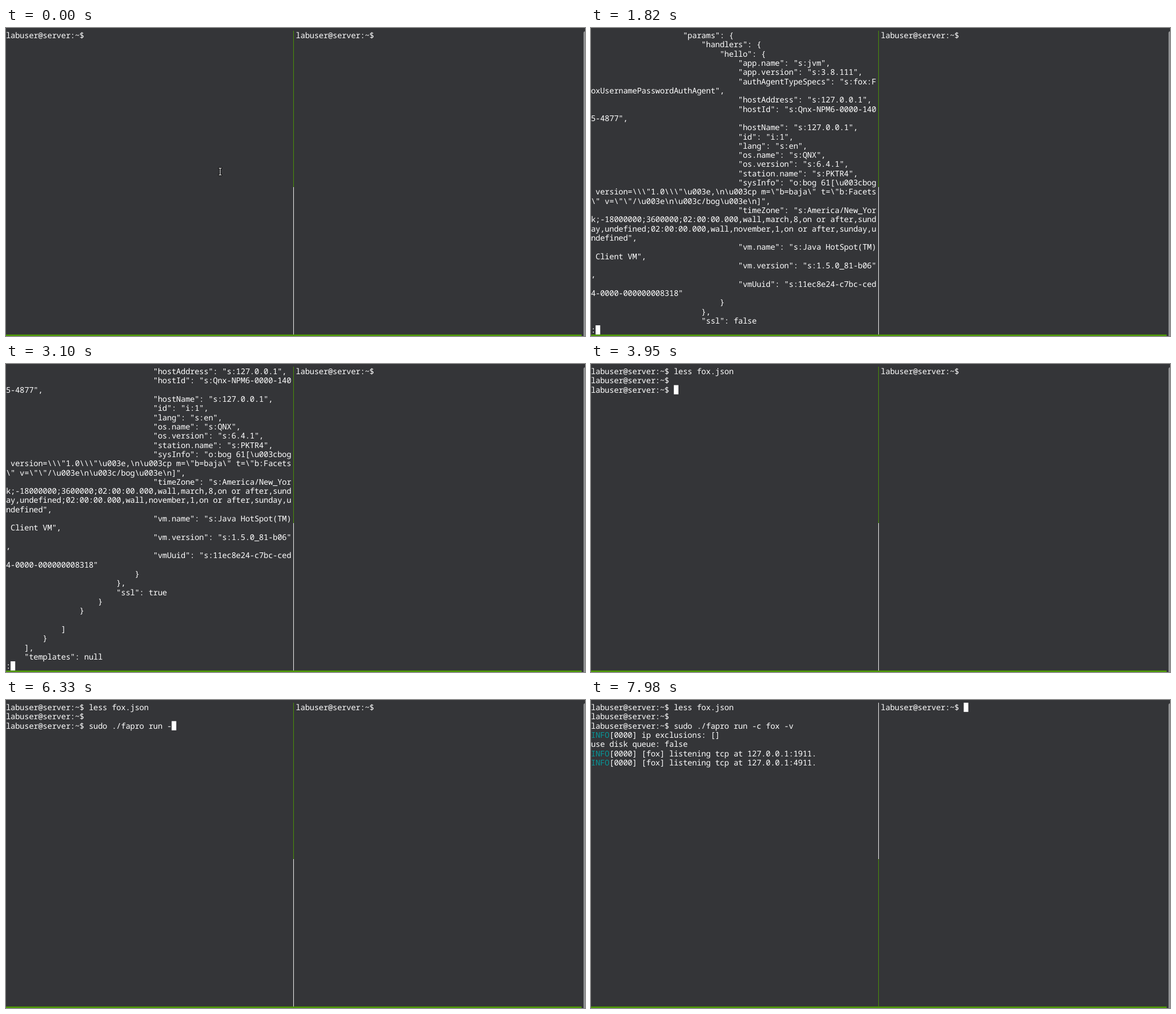
An HTML page with a canvas that plays this animation: 1026 by 546 pixels, repeating every 8 s.

```html
<!DOCTYPE html>
<html lang="en">
<head>
<meta charset="utf-8">
<title>Terminal session</title>
<style>
  html, body { margin: 0; width: 100%; height: 100%; overflow: hidden; background: #343538; }
  canvas { display: block; }
</style>
</head>
<body>
<canvas id="stage" width="1026" height="546"></canvas>
<script>
const ctx = document.getElementById('stage').getContext('2d');
const LOOP = 8000, COLS = 62, ROWS = 33;
const CELL_W = 8.154, CELL_H = 16.32, TOP = 4.8;
const BG = '#343538', FG = '#ffffff', GREEN = '#4e9a06', CYAN = '#06989a';
const PROMPT = 'labuser@server:~$ ';
const LESS = 'less fox.json', RUN = 'sudo ./fapro run -c fox -v ';

const handler = (port, ssl, end) => String.raw`                {
                    "handler": "fox",
                    "port": ${port},
                    "params": {
                        "handlers": {
                            "hello": {
                                "app.name": "s:jvm",
                                "app.version": "s:3.8.111",
                                "authAgentTypeSpecs": "s:fox:FoxUsernamePasswordAuthAgent",
                                "hostAddress": "s:127.0.0.1",
                                "hostId": "s:Qnx-NPM6-0000-1405-4877",
                                "hostName": "s:127.0.0.1",
                                "id": "i:1",
                                "lang": "s:en",
                                "os.name": "s:QNX",
                                "os.version": "s:6.4.1",
                                "station.name": "s:PKTR4",
                                "sysInfo": "o:bog 61[\u003cbog version=\\\"1.0\\\"\u003e,\n\u003cp m=\"b=baja\" t=\"b:Facets\" v=\"\"/\u003e\n\u003c/bog\u003e\n]",
                                "timeZone": "s:America/New_York;-18000000;3600000;02:00:00.000,wall,march,8,on or after,sunday,undefined;02:00:00.000,wall,november,1,on or after,sunday,undefined",
                                "vm.name": "s:Java HotSpot(TM) Client VM",
                                "vm.version": "s:1.5.0_81-b06",
                                "vmUuid": "s:11ec8e24-c7bc-ced4-0000-000000008318"
                            }
                        },
                        "ssl": ${ssl}
                    }
                }${end}
`;

const json = `{
    "version": "0.38",
    "network": "127.0.0.1/32",
    "network_build": "localhost",
    "storage": null,
    "geo_db": "",
    "hosts": [
        {
            "ip": "127.0.0.1",
            "handlers": [
${handler(1911, false, ',')}${handler(4911, true, '')}
            ]
        }
    ],
    "templates": null
}`;
const fileRows = json.split('\n').flatMap(line => line.match(new RegExp(`.{1,${COLS}}`, 'g')) || ['']);

// Key press times
const keys = (start, count, gap = 70) => Array.from({ length: count }, (_, i) => start + i * gap);
const lessKeys = [...keys(140, 10), 880, 950, 1030];
const runKeys = [...keys(5000, 5), 5420, ...keys(5530, 11, 69), ...keys(6330, 7), ...keys(6960, 3)];
const typed = (text, times, t) => text.slice(0, times.filter(k => t >= k).length);

const scrolls = [[0, 0], [1820, 13], [2030, 25], [2640, 41], [3100, 57]];
const cursorOff = [[0, 70], [1600, 1780], [2350, 2390], [2920, 3100], [3380, 3590],
                   [4270, 4590], [4910, 4950], [7520, 7560]];

function rect(x, y, w, h, color) {
  ctx.fillStyle = color;
  ctx.fillRect(x, y, w, h);
}

function cell(col, row, count = 1) {
  rect(col * CELL_W, TOP + row * CELL_H, count * CELL_W, CELL_H, FG);
}

function write(text, row, col = 0, color = FG) {
  ctx.fillStyle = color;
  const y = TOP + row * CELL_H + 13.2;
  [...text].forEach((ch, i) => ch !== ' ' && ctx.fillText(ch, (col + i + 0.5) * CELL_W, y));
}

// Each screen writes its rows and returns the cursor cell
function pager(t) {
  const top = scrolls.filter(([at]) => t >= at).pop()[1];
  fileRows.slice(top, top + ROWS - 1).forEach((line, row) => write(line, row));
  const last = ROWS - 1;
  if (t < 1820) {
    cell(0, last, 8);
    write('fox.json', last, 0, BG);
    return [8, last];
  }
  const prompt = t < 3700 ? ':' : ' :';
  write(prompt, last);
  return [prompt.length, last];
}

function shell(t) {
  const lines = [PROMPT + typed(LESS, lessKeys, t)];
  if (t >= 3880) lines.push(PROMPT);
  if (t >= 3950) lines.push(PROMPT + typed(RUN, runKeys, t));
  lines.forEach((line, row) => write(line, row));
  if (t < 7240) return [lines.at(-1).length, lines.length - 1];

  ['ip exclusions: []', '', '[fox] listening tcp at 127.0.0.1:1911.', '[fox] listening tcp at 127.0.0.1:4911.']
    .forEach((message, i) => {
      if (!message) return write('use disk queue: false', 3 + i);
      write('INFO', 3 + i, 0, CYAN);
      write('[0000] ' + message, 3 + i, 4);
    });
  return [0, 7];
}

function mousePointer() {
  for (const [grow, color] of [[1, '#111111'], [0, FG]]) {
    for (const [x, y, w, h] of [[377, 248, 5, 1], [379, 248, 1, 13], [377, 260, 5, 1]])
      rect(x - grow, y - grow, w + 2 * grow, h + 2 * grow, color);
  }
}

function scrollbar() {
  ctx.fillStyle = '#939496';
  ctx.beginPath();
  ctx.roundRect(1023.4, 6, 6, 560, 3);
  ctx.fill();
}

function draw(t) {
  const rightActive = t >= 7980;
  rect(0, 0, 1026, 546, BG);
  scrollbar();
  rect(0, 543.4, 1020, 3, GREEN);
  rect(509.1, TOP, 0.96, 277.2, rightActive ? FG : GREEN);
  rect(509.1, 282, 0.96, 261.4, rightActive ? GREEN : FG);

  ctx.font = '14px "Noto Sans Mono", "DejaVu Sans Mono", monospace';
  ctx.textRendering = 'geometricPrecision';
  ctx.textAlign = 'center';
  write(PROMPT, 0, COLS + 1);
  const cursor = t >= 1140 && t < 3880 ? pager(t) : shell(t);
  if (rightActive) cell(COLS + 1 + PROMPT.length, 0);
  else if (!cursorOff.some(([from, to]) => t >= from && t < to)) cell(...cursor);
  if (t < 140) mousePointer();
}

const start = performance.now();
function frame() {
  draw((performance.now() - start) % LOOP);
  requestAnimationFrame(frame);
}
frame();
</script>
</body>
</html>
```
